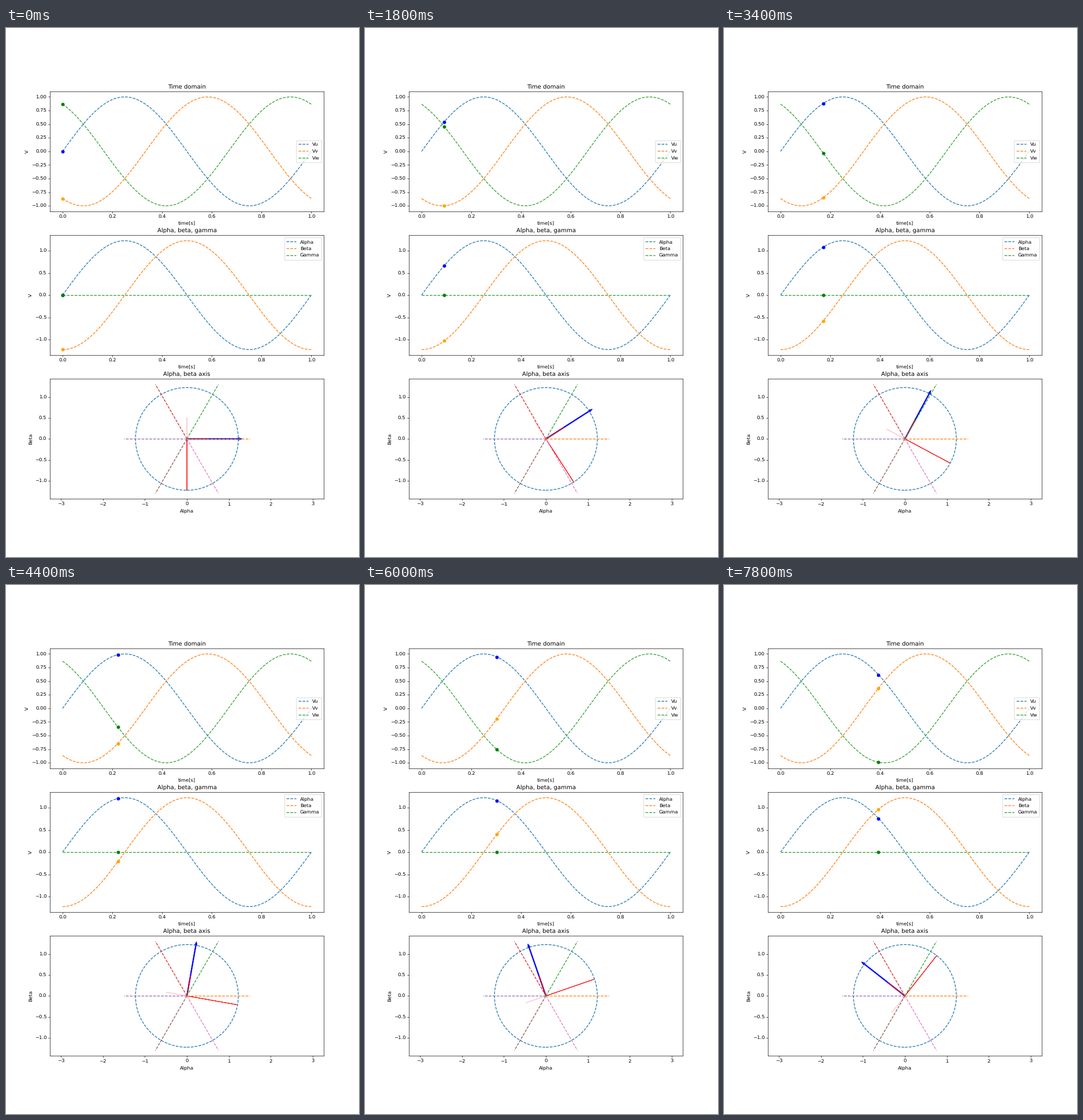
A matplotlib script that plays this animation: 611 px wide and 917 px high, repeating every 8000 ms.

```python
import numpy as np
import matplotlib.pyplot as plt
from matplotlib.animation import FuncAnimation
from matplotlib.patches import FancyArrow

W, H, DPI = 611, 917, 61.1
FRAMES, INTERVAL = 40, 200

plt.rcParams["text.hinting"] = "none"

# Three-phase voltages and their power-invariant Clarke transform
t = np.linspace(0, 1, 100)
u, v, w = (np.sin(2 * np.pi * t + shift)
           for shift in (0, -2 * np.pi / 3, 2 * np.pi / 3))
k = np.sqrt(2 / 3)
alpha = k * (u - v / 2 - w / 2)
beta = k * np.sqrt(3) / 2 * (v - w)
gamma = np.zeros_like(t)

fig, (ax_time, ax_abc, ax_plane) = plt.subplots(
    3, 1, figsize=(W / DPI, (H + 0.01) / DPI), dpi=DPI)


def label(ax, title, xlabel, ylabel):
    ax.set_title(title)
    ax.set_xlabel(xlabel)
    ax.set_ylabel(ylabel)


def plot_waves(ax, waves, names, loc):
    """Draw dashed curves and return (marker, curve) pairs."""
    for wave, name in zip(waves, names):
        ax.plot(t, wave, "--", label=name)
    ax.legend(loc=loc)
    return [(ax.plot([], [], "o", color=color)[0], wave)
            for color, wave in zip(("blue", "orange", "green"), waves)]


dots = plot_waves(ax_time, (u, v, w), ("Vu", "Vv", "Vw"), "center right")
dots += plot_waves(ax_abc, (alpha, beta, gamma),
                   ("Alpha", "Beta", "Gamma"), "upper right")
label(ax_time, "Time domain", "time[s]", "V")
label(ax_abc, "Alpha, beta, gamma", "time[s]", "V")
label(ax_plane, "Alpha, beta axis", "Alpha", "Beta")

ax_plane.plot(alpha, beta, "--")
for angle in np.arange(6) * np.pi / 3:
    ax_plane.plot([0, 1.5 * np.cos(angle)], [0, 1.5 * np.sin(angle)], "--")
ax_plane.axis("equal")
ax_plane.apply_aspect()
ax_plane.set_autoscale_on(False)

vectors = []


def add_vector(x, y, color, width=0.001):
    arrow = FancyArrow(0, 0, x, y, width=width, color=color)
    vectors.append(ax_plane.add_patch(arrow))


def update(i):
    for dot, wave in dots:
        dot.set_data([t[i]], [wave[i]])
    while vectors:
        vectors.pop().remove()
    a, b = alpha[i], beta[i]
    r = np.hypot(a, b)
    add_vector(-b, a, "blue", 0.02)
    add_vector(a, b, "red")
    add_vector(-0.5 * a / r, -0.5 * b / r, "pink")
    add_vector(-0.5 * b / r, 0.5 * a / r, "red")
    return [dot for dot, _ in dots] + vectors


anim = FuncAnimation(fig, update, frames=FRAMES, interval=INTERVAL,
                     init_func=lambda: update(0), repeat=True)
plt.show()
```
